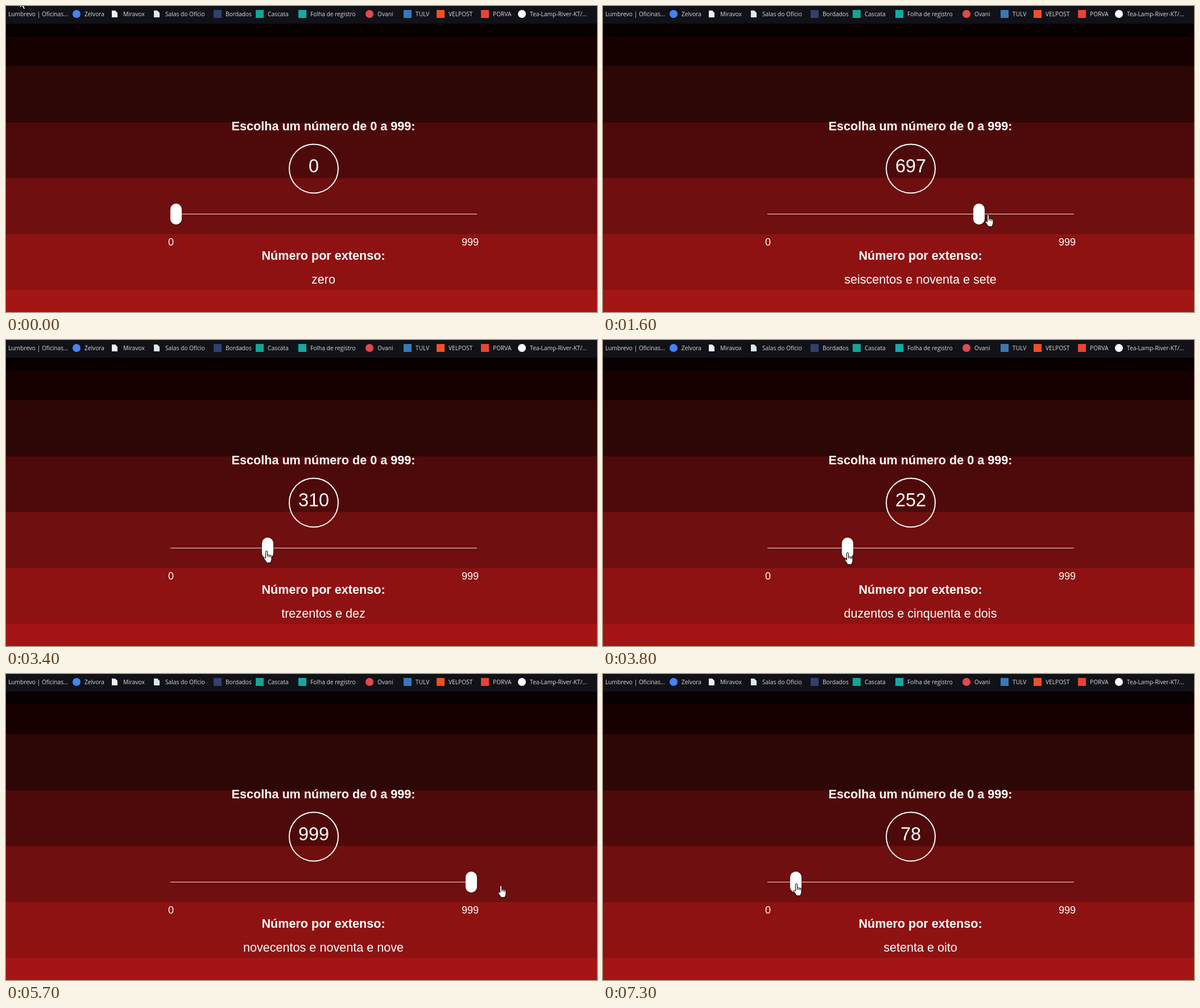
These frames come from a looping animation (1039 px wide and 539 px high, 8 s). An HTML page:

```html
<!DOCTYPE html>
<html lang="pt">
<head>
<meta charset="utf-8">
<title>Número por extenso</title>
<style>
  html, body { margin: 0; width: 100%; height: 100%; overflow: hidden; background: #090000; }
  svg { display: block; width: 100%; height: 100%; }
  text { fill: #fff; font-family: "Liberation Sans", Arial, sans-serif; font-size: 21.6px; text-anchor: middle; }
  .title { font-weight: bold; }
  .limit { font-size: 18px; }
  #number { font-size: 32.4px; }
  #bookmarks text { fill: #dcd8e0; font: 10.2px "Open Sans", "Noto Sans", sans-serif; text-anchor: start; }
  .cursor { fill: #fff; stroke: #000; stroke-linejoin: round; }
</style>
</head>
<body>
<svg viewBox="0 0 1039 539">
  <g id="bands">
    <rect width="1039" height="31" fill="#111218"/>
    <rect y="54" width="1039" height="485" fill="#170100"/>
  </g>
  <g id="bookmarks"></g>
  <text class="title" x="558" y="219">Escolha um número de 0 a 999:</text>
  <circle cx="541" cy="286.5" r="43" fill="none" stroke="#fff" stroke-width="2"/>
  <text id="number" x="541" y="293"></text>
  <rect x="289" y="366" width="539" height="1" fill="#f3e4e4"/>
  <g id="thumb">
    <rect x="-9" y="349" width="20" height="37" rx="10" opacity=".3"/>
    <rect x="-10" y="348" width="20" height="37" rx="10" fill="#fff"/>
  </g>
  <text class="limit" x="290" y="422">0</text>
  <text class="limit" x="816" y="422">999</text>
  <text class="title" x="558" y="447">Número por extenso:</text>
  <text id="words" x="558" y="489"></text>
  <path id="arrow" class="cursor" d="M.5.5v16l3.8-3.6 2.7 6 2.6-1.1-2.7-5.8h5z"/>
  <g id="hand" class="cursor">
    <path d="M-1.5 13V2a1.5 1.5 0 0 1 3 0v6c0-1 2.7-1 2.7.4 0-1 2.5-.8 2.5.6 0-.9 2.3-.7 2.3 1v5c0 3-2 4-2 6.5H0c0-2-2.5-4-4.5-7.5-1.3-2 .8-3 3-.5z"/>
    <path d="M1.5 8v3M4.2 8.5v3M6.7 9v3" fill="none"/>
  </g>
</svg>
<script>
const LOOP = 8000, STEP = 100, GRAB = 900;
const $ = id => document.getElementById(id);

function add(parent, tag, attrs, text = '') {
  const el = document.createElementNS('http://www.w3.org/2000/svg', tag);
  for (const key in attrs) el.setAttribute(key, attrs[key]);
  el.textContent = text;
  parent.append(el);
}

['#2d0606', '#4e0a0a', '#6f0f0f', '#8f1212', '#a41515'].forEach((fill, i) =>
  add($('bands'), 'rect', { y: Math.round(106 + 98.5 * i), width: 1039, height: 99, fill }));

const icons = {
  dot: (cx, fill) => ['circle', { cx, cy: 14, r: 7, fill }],
  box: (cx, fill) => ['rect', { x: cx - 7, y: 7, width: 14, height: 14, fill }],
  page: (cx, fill) => ['path', { d: `M${cx - 6} 8h6l4 4v8h-10z`, fill }]
};

function bookmark(x, label, shape, color) {
  if (shape) add($('bookmarks'), ...icons[shape](x - 14, color));
  add($('bookmarks'), 'text', { x, y: 18 }, label);
}
bookmark(4, 'Lumbrevo | Oficinas...');
bookmark(138, 'Zelvora', 'dot', '#4285f4');
bookmark(206, 'Miravox', 'page', '#f1f1f1');
bookmark(280, 'Salas do Ofício', 'page', '#dce8f0');
bookmark(386, 'Bordados', 'box', '#31406f');
bookmark(460, 'Cascata', 'box', '#12a594');
bookmark(535, 'Folha de registro', 'box', '#12aaa6');
bookmark(653, 'Ovani', 'dot', '#e5484d');
bookmark(720, 'TULV', 'box', '#3779b8');
bookmark(778, 'VELPOST', 'box', '#f25022');
bookmark(856, 'PORVA', 'box', '#ea4335');
bookmark(921, 'Tea-Lamp-River-KT/...', 'dot', '#fff');

const units = ('zero um dois três quatro cinco seis sete oito nove dez onze doze treze ' +
  'quatorze quinze dezesseis dezessete dezoito dezenove').split(' ');
const tens = '- - vinte trinta quarenta cinquenta sessenta setenta oitenta noventa'.split(' ');
const hundreds = ('- cento duzentos trezentos quatrocentos quinhentos seiscentos ' +
  'setecentos oitocentos novecentos').split(' ');

function spell(n) {
  if (n === 100) return 'cem';
  if (n < 20) return units[n];
  const size = n < 100 ? 10 : 100;
  const head = (size === 10 ? tens : hundreds)[Math.floor(n / size)];
  return n % size ? `${head} e ${spell(n % size)}` : head;
}

// Each move leads from the previous pose to its own; x and y are the pointer tip.
const moves = [];
const move = (start, end, pose) => moves.push({ start, end, pose });
move(0, 700, { value: 0, x: 319, y: 428 });
move(700, 900, { value: 0, x: 302, y: 370 });
move(1000, 1200, { value: 66, x: 343, y: 367 });
move(1200, 1600, { value: 697, x: 677, y: 367 });
move(1600, 1800, { value: 786, x: 701, y: 369 });
move(3000, 3400, { value: 310, x: 458, y: 371 });
move(3500, 3800, { value: 252, x: 430, y: 374 });
move(5300, 5700, { value: 999, x: 870, y: 372 });
move(5700, 5800, { value: 999, x: 872, y: 367 });
move(6000, 6400, { value: 999, x: 825, y: 366 });
move(6600, 7300, { value: 78, x: 340, y: 369 });

const mix = (a, b, p) => Math.round(a + (b - a) * p);

function poseAt(time) {
  let now = { value: 0, x: 24, y: -13 };
  for (const { start, end, pose } of moves) {
    if (time <= start) break;
    const p = Math.min(1, (time - start) / (end - start));
    now = { value: mix(now.value, pose.value, p), x: mix(now.x, pose.x, p), y: mix(now.y, pose.y, p) };
  }
  return now;
}

const place = (el, x, y) => el.setAttribute('transform', `translate(${x} ${y})`);

function draw(now) {
  const time = Math.floor(now % LOOP / STEP) * STEP;
  const { value, x, y } = poseAt(time);
  $('number').textContent = value;
  $('words').textContent = spell(value);
  place($('thumb'), Math.round(298.5 + value * 0.52), 0);

  const grabbing = time >= GRAB;
  $('hand').style.display = grabbing ? '' : 'none';
  $('arrow').style.display = grabbing ? 'none' : '';
  place($(grabbing ? 'hand' : 'arrow'), x, y);
  requestAnimationFrame(draw);
}
draw(performance.now());
</script>
</body>
</html>
```
